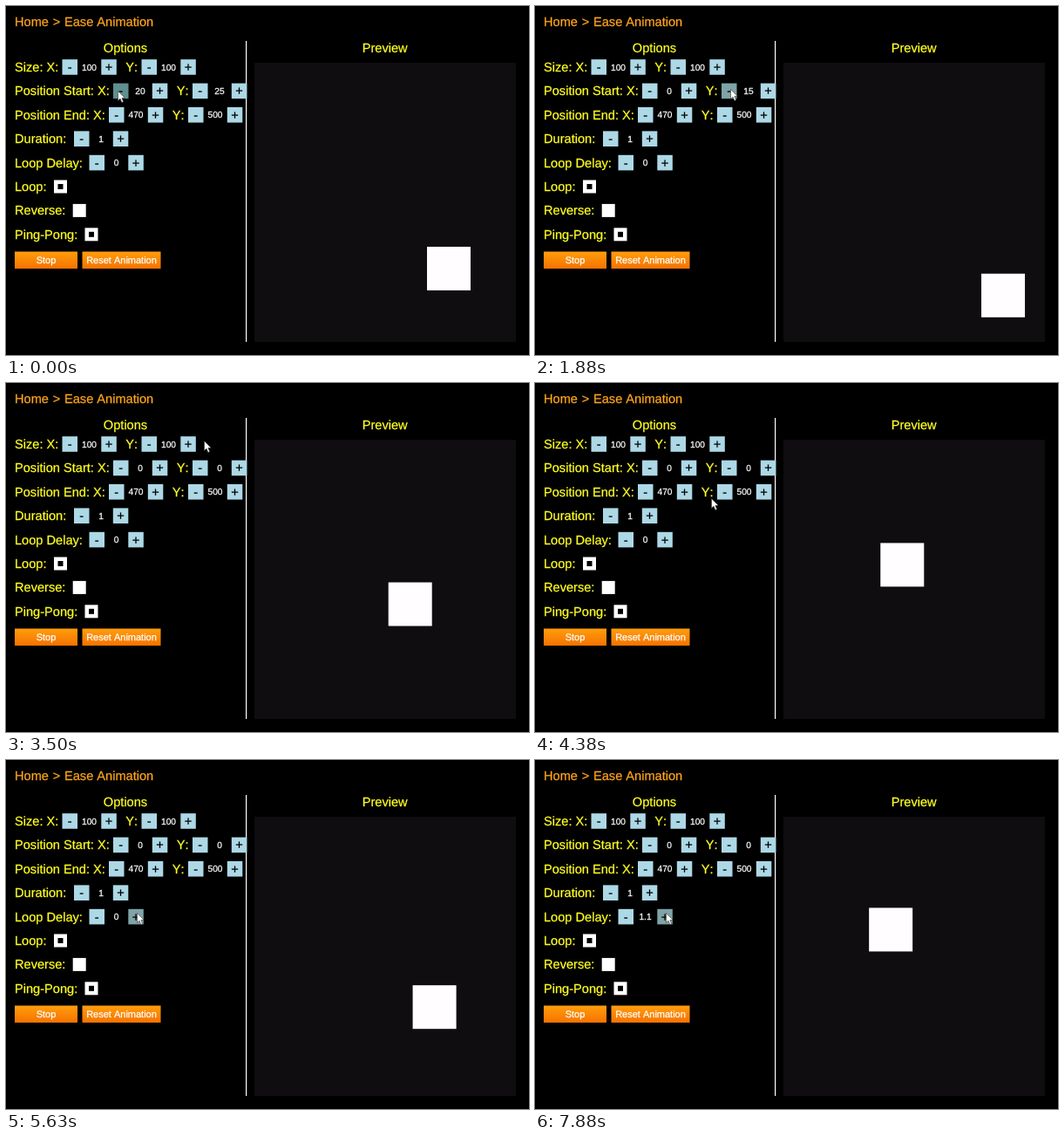
An HTML page with a canvas for the animation above (8000 ms loop, 600 px wide and 400 px high).

```html
<!DOCTYPE html>
<html>
<head>
<meta charset="utf-8">
<style>
html, body { margin: 0; width: 600px; height: 400px; overflow: hidden; background: #000; }
canvas { display: block; }
</style>
</head>
<body>
<canvas id="stage" width="600" height="400"></canvas>
<script>
const ctx = document.getElementById('stage').getContext('2d');
const LOOP = 8000;
const LEG = 1003;        // one way along the path
const FIRST_START = 838; // the square is first back at its start
const PAUSE_AT = FIRST_START + 6 * LEG, PAUSE = 600;
const GLIDE = 250;       // one pointer move
const YELLOW = '#ffff22';
const ARROW = new Path2D('M0 0V11L2.5 8.7L4.3 13L6.2 12.2L4.4 8.1L7.7 7.8Z');

const CLICKS = {
  startX: { from: 0, until: 880, period: 200, max: 4 },
  startY: { from: 1480, until: 2630, period: 200, max: 5 },
  delay: { from: 5634, until: LOOP, period: 206, max: 99 }
};
// Where the pointer rests, and when it gets there
const STOPS = [
  { at: 0, x: 129, y: 98 },
  { at: 1125, x: 185, y: 96 },
  { at: 1375, x: 225, y: 96 },
  { at: 3000, x: 228, y: 67 },
  { at: 4375, x: 203, y: 133 },
  { at: 5000, x: 117, y: 176 },
  { at: 5375, x: 151, y: 176 }
];

const clamp = (v, lo, hi) => Math.min(hi, Math.max(lo, v));
const mix = (a, b, u) => a + (b - a) * u;

// Linear ping-pong that waits once at its start
function progress(t) {
  if (t > PAUSE_AT) t = Math.max(PAUSE_AT, t - PAUSE);
  const phase = Math.abs(t - FIRST_START) / LEG % 2;
  return 1 - Math.abs(1 - phase);
}

function pointerAt(t) {
  return STOPS.reduce((p, stop) => {
    const u = clamp((t - stop.at) / GLIDE + 1, 0, 1);
    const eased = u * u * (3 - 2 * u);
    return { x: mix(p.x, stop.x, eased), y: mix(p.y, stop.y, eased) };
  }, STOPS[0]);
}

// Values change on release, half way through each click.
const phase = (c, t) => (t - c.from) / c.period;
const count = (c, t) => clamp(Math.floor(phase(c, t) + .5), 0, c.max);
const isDown = t => Object.values(CLICKS).some(c =>
  t >= c.from && t < c.until && phase(c, t) % 1 < .5);

function rect(x, y, w, h, color) {
  ctx.fillStyle = color;
  ctx.fillRect(x, y, w, h);
}

function text(s, x, y, color, size = 14.6, align = 'left') {
  ctx.font = size + 'px "Liberation Sans", Arial, sans-serif';
  ctx.textAlign = align;
  ctx.fillStyle = ctx.strokeStyle = color;
  ctx.lineWidth = .25;
  ctx.fillText(s, x, y);
  ctx.strokeText(s, x, y);
}

function stepButton(sign, x, y, mouse) {
  const over = mouse.x >= x && mouse.x <= x + 17.5 && Math.abs(mouse.y - y) <= 9;
  rect(x, y - 8.8, 17.5, 17.6, !over ? '#add8e6' : mouse.down ? '#5f8f8f' : '#7fa3a6');
  text(sign, x + 8.6, y + 5, '#000', 14.6, 'center');
}

function stepper(x, y, value, mouse) {
  stepButton('-', x, y, mouse);
  text(value, x + 31, y + 3.5, '#fff', 10.2, 'center');
  stepButton('+', x + 44.8, y, mouse);
}

const rowY = i => 70 + 27.4 * i;

function row(i, label, x, values, mouse) {
  text(label, 10, rowY(i) + 5, YELLOW);
  values.forEach((value, k) => {
    if (k) text('Y:', x + 72.7, rowY(i) + 5, YELLOW);
    stepper(x + 91 * k, rowY(i), value, mouse);
  });
}

function checkbox(i, label, x, on) {
  const y = rowY(i);
  text(label, 10, y + 5, YELLOW);
  rect(x, y - 7.5, 15, 15, '#fff');
  if (on) rect(x + 4.5, y - 3, 6, 6, '#000');
}

function action(label, x, w) {
  const fill = ctx.createLinearGradient(0, 281, 0, 301);
  fill.addColorStop(0, '#ff9f0c');
  fill.addColorStop(1, '#f67200');
  rect(x, 281.5, w, 19.5, fill);
  text(label, x + w / 2, 295, '#fff', 11, 'center');
}

function drawPointer({ x, y }) {
  ctx.save();
  ctx.translate(x - .5, y - .5);
  ctx.fillStyle = '#fff';
  ctx.strokeStyle = '#333';
  ctx.lineWidth = .6;
  ctx.fill(ARROW);
  ctx.stroke(ARROW);
  ctx.restore();
}

function draw(t) {
  const mouse = { ...pointerAt(t), down: isDown(t) };
  const startX = 20 - 5 * count(CLICKS.startX, t);
  const startY = 25 - 5 * count(CLICKS.startY, t);
  const clicks = count(CLICKS.delay, t);

  rect(0, 0, 600, 400, '#000');
  text('Home', 10, 23, '#ffa51c');
  text('>', 53.8, 23, '#ffa51c');
  text('Ease Animation', 67, 23, '#ffa51c');
  text('Options', 137, 53, YELLOW, 14.6, 'center');
  text('Preview', 434.7, 53, YELLOW, 14.6, 'center');
  rect(275, 40, 1.2, 345, '#fff');

  row(0, 'Size: X:', 64.5, [100, 100], mouse);
  row(1, 'Position Start: X:', 123, [startX, startY], mouse);
  row(2, 'Position End: X:', 118, [470, 500], mouse);
  row(3, 'Duration:', 78, [1], mouse);
  row(4, 'Loop Delay:', 95.5, [clicks ? (clicks / 10).toFixed(1) : 0], mouse);
  checkbox(5, 'Loop:', 55, true);
  checkbox(6, 'Reverse:', 76.7, false);
  checkbox(7, 'Ping-Pong:', 90.5, true);
  action('Stop', 10, 72);
  action('Reset Animation', 87.5, 90);

  const u = progress(t);
  rect(285, 65, 300, 320, '#0f0d10');
  rect(285 + mix(startX, 470, u) / 2, 65 + mix(startY, 500, u) / 2, 50, 50, '#fffdff');
  drawPointer(mouse);
}

// The picture advances eight times a second, on times rounded to 10 ms.
function frame() {
  const t = performance.now() % LOOP;
  draw(t - t % 250 + (t % 250 >= 130 ? 125 : 0));
  requestAnimationFrame(frame);
}
ctx.fontKerning = 'none';
ctx.textRendering = 'geometricPrecision';
frame();
</script>
</body>
</html>
```
